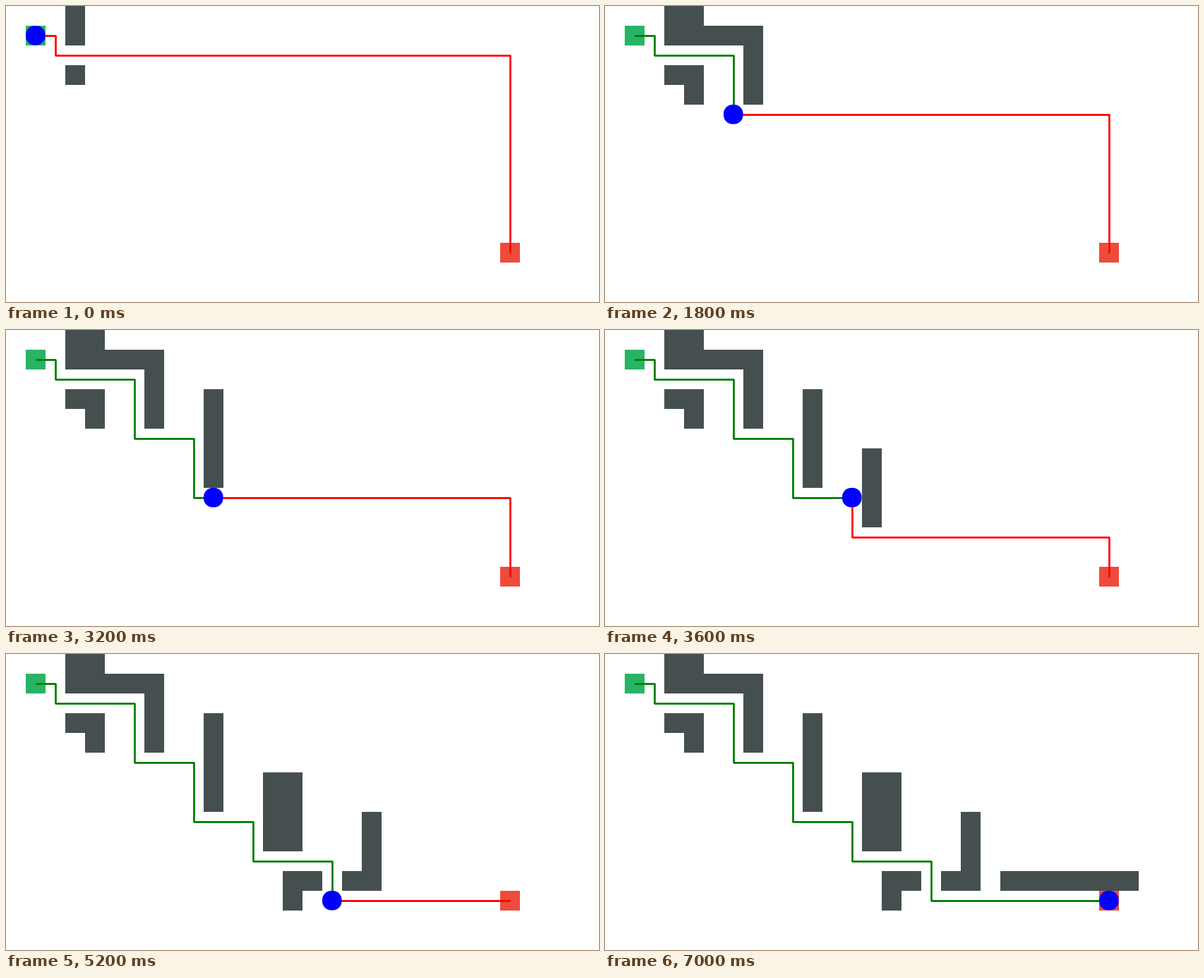
An HTML page that plays this animation: 900 by 450 pixels, repeating every 7.2 s.

```html
<!DOCTYPE html>
<html lang="en">
<head>
<meta charset="utf-8">
<title>Grid robot replanning its route</title>
<style>
  html, body { margin: 0; width: 100%; height: 100%; overflow: hidden; background: #fff; }
  svg { display: block; width: 900px; height: 450px; }
  polyline { fill: none; stroke-width: 3; stroke-linejoin: bevel; shape-rendering: crispEdges; }
</style>
</head>
<body>
<svg viewBox="0 0 900 450">
  <rect x="30" y="30" width="30" height="30" fill="#28b465"/>
  <rect x="750" y="360" width="30" height="30" fill="#ee4b3c"/>
  <path id="walls" fill="#454f4f" shape-rendering="crispEdges"/>
  <polyline id="plan" stroke="#f00"/>
  <polyline id="trail" stroke="#008000"/>
  <rect id="robot" width="29.5" height="29.5" rx="13.5" fill="#00f"/>
</svg>
<script>
const CELL = 30, STEP = 200, SIGHT = 2;
const START = [1, 1], GOAL = [25, 12];
const $ = id => document.getElementById(id);

// Each wall is a chain of cells given by its corners.
const walls = [
  [[4, 0], [3, 0], [3, 1], [7, 1], [7, 4]],
  [[3, 3], [4, 3], [4, 4]],
  [[10, 3], [10, 7]],
  [[13, 6], [13, 9], [14, 9], [14, 6]],
  [[14, 12], [14, 11], [15, 11]],
  [[17, 11], [18, 11], [18, 8]],
  [[20, 11], [26, 11]]
].flatMap(fill);

function fill(corners) {
  const cells = [corners[0]];
  for (const [cx, cy] of corners) {
    let [x, y] = cells[cells.length - 1];
    while (x !== cx || y !== cy) {
      x += Math.sign(cx - x);
      y += Math.sign(cy - y);
      cells.push([x, y]);
    }
  }
  return cells;
}

const inSight = ([rx, ry]) => ([x, y]) => Math.max(Math.abs(rx - x), Math.abs(ry - y)) <= SIGHT;

// Shortest route through known cells: right if possible, otherwise down.
function findPath([x, y], known) {
  if (x > GOAL[0] || y > GOAL[1] || known.some(c => c[0] === x && c[1] === y)) return null;
  if (x === GOAL[0] && y === GOAL[1]) return [GOAL];
  const rest = findPath([x + 1, y], known) || findPath([x, y + 1], known);
  return rest && [[x, y], ...rest];
}

// Look around, replan and move one cell until the goal is reached.
function explore() {
  let seen = new Set(walls.filter(inSight(START)));
  let plan = findPath(START, [...seen]);
  const trail = [START];
  const states = [{ known: [...seen], plan, trail: [START] }];
  while (plan.length > 1) {
    const here = plan[0];
    walls.filter(inSight(here)).forEach(c => seen.add(c));
    plan = findPath(here, [...seen]).slice(1);
    trail.push(plan[0]);
    states.push({ known: [...seen], plan, trail: [...trail] });
  }
  return states;
}
const states = explore();

const points = (cells, shift) =>
  cells.map(c => c.map(v => (v + .5) * CELL + shift).join()).join(" ");

let last = -1;
function draw(time) {
  const step = Math.floor(time / STEP) % states.length;
  if (step === last) return;
  last = step;
  const { known, plan, trail } = states[step];
  $("walls").setAttribute("d",
    known.map(([x, y]) => `M${x * CELL} ${y * CELL}h${CELL}v${CELL}h${-CELL}z`).join(""));
  $("plan").setAttribute("points", points(plan, .6));
  $("trail").setAttribute("points", points(trail, .4));
  $("robot").setAttribute("x", plan[0][0] * CELL);
  $("robot").setAttribute("y", plan[0][1] * CELL);
}

const start = performance.now();
function tick() {
  draw(performance.now() - start);
  requestAnimationFrame(tick);
}
tick();
</script>
</body>
</html>
```
